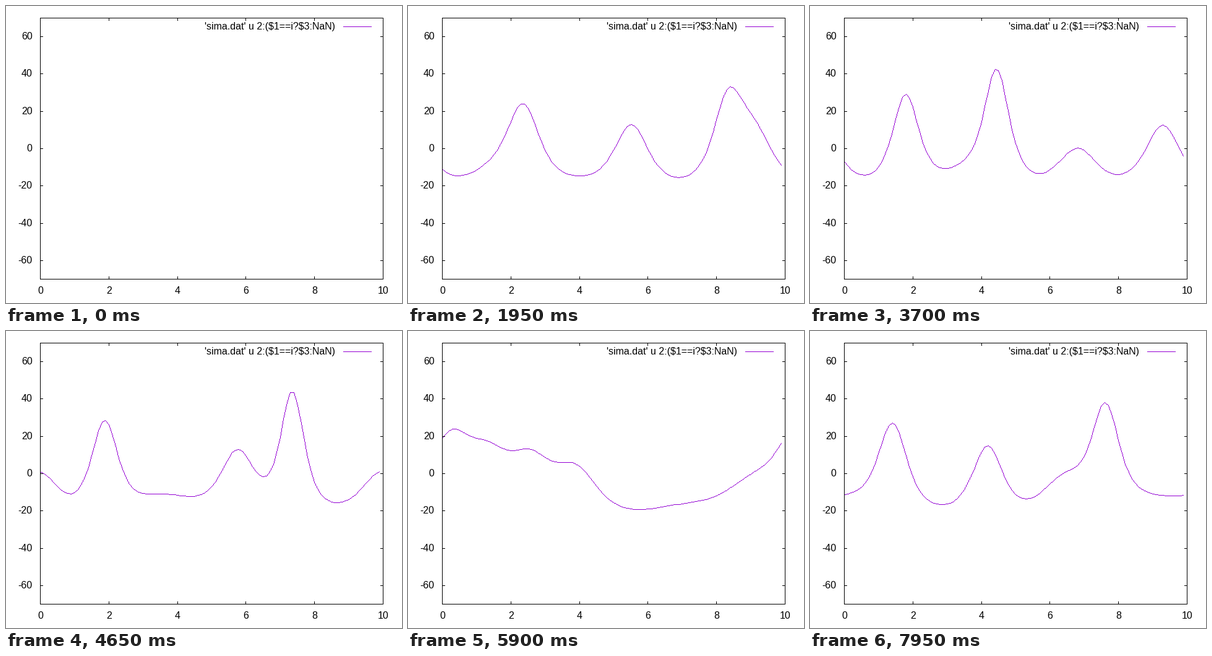
A matplotlib script for the animation above (8000 ms loop, 640 by 480 pixels).

```python
import numpy as np
import matplotlib.pyplot as plt
from matplotlib.animation import FuncAnimation

W, H, DPI = 640, 480, 100
FRAMES, INTERVAL = 160, 50
LEFT, RIGHT, TOP, BOTTOM = 55, 609, 19, 441
XMAX, YMAX, TICK = 10, 70, 4
PURPLE = "#9400d3"
FONT = dict(family="Liberation Sans", size=16 * 72 / DPI, color="black")

# Korteweg-de Vries equation u_t + u u_x + u_xxx = 0 on a ring,
# with the central differences of Zabusky and Kruskal
N, AMP = 100, 20
DX = XMAX / N
FRAME_DT, SUBSTEPS = 0.02, 40


def slope(u):
    p = np.concatenate((u[-2:], u, u[:2]))
    l2, l1, r1, r2 = p[:-4], p[1:-3], p[3:-1], p[4:]
    steepen = (l1 + u + r1) * (r1 - l1) / (6 * DX)
    disperse = (r2 - 2 * r1 + 2 * l1 - l2) / (2 * DX**3)
    return -steepen - disperse


def solve():
    x = np.arange(N) * DX
    u = AMP * np.sin(2 * np.pi * x / XMAX)
    h = FRAME_DT / SUBSTEPS
    rows = [u]
    for _ in range(FRAMES - 1):
        for _ in range(SUBSTEPS):
            a = slope(u)
            b = slope(u + h / 2 * a)
            c = slope(u + h / 2 * b)
            d = slope(u + h * c)
            u = u + h / 6 * (a + 2 * b + 2 * c + d)
        rows.append(u)
    return x, np.array(rows)


def px(x):
    return np.rint(LEFT + np.asarray(x) * (RIGHT - LEFT) / XMAX).astype(int)


def py(y):
    mid, scale = (TOP + BOTTOM) / 2, (BOTTOM - TOP) / (2 * YMAX)
    return np.rint(mid - np.asarray(y) * scale).astype(int)


fig = plt.figure(figsize=(W / DPI, H / DPI), dpi=DPI, facecolor="white")
ax = fig.add_axes([0, 0, 1, 1])


def box(x0, y0, x1, y1, color="black"):
    """Fill whole pixels from (x0, y0) to (x1, y1), both included."""
    ax.add_patch(plt.Rectangle((x0, y0), x1 - x0 + 1, y1 - y0 + 1, fc=color,
                               lw=0, antialiased=False, zorder=3))


def label(x, y, text, align):
    ax.text(x, y, text, ha=align, va="baseline", **FONT)


for y in (TOP, BOTTOM):
    box(LEFT, y, RIGHT, y)
for x in (LEFT, RIGHT):
    box(x, TOP, x, BOTTOM)

for v in range(0, XMAX + 1, 2):
    x = int(px(v))
    box(x, BOTTOM - TICK, x, BOTTOM)
    box(x, TOP, x, TOP + TICK)
    label(x + 0.5, 465, str(v), "center")

for v in range(-60, 61, 20):
    y = int(py(v))
    box(LEFT, y, LEFT + TICK, y)
    box(RIGHT - TICK, y, RIGHT, y)
    label(42.5, y + 5, str(v), "right")

label(532, 38, r"'sima.dat' u 2:(\$1==i?\$3:NaN)", "right")
box(545, 33, 590, 33, PURPLE)

# The curve is a hard-edged line one pixel wide, drawn on a clear layer
INK = np.array([0x94, 0x00, 0xD3, 0xFF], np.uint8)
layer = np.zeros((H, W, 4), np.uint8)
picture = ax.imshow(layer, extent=(0, W, H, 0), interpolation="nearest",
                    aspect="auto", zorder=2)
ax.set_xlim(0, W)
ax.set_ylim(H, 0)
ax.axis("off")

X, U = solve()


def update(n):
    layer[:] = 0
    if n > 0:
        xs, ys = px(X), py(U[n])
        for x0, y0, x1, y1 in zip(xs, ys, xs[1:], ys[1:]):
            t = np.linspace(0, 1, max(x1 - x0, abs(y1 - y0)) + 1)
            cols = np.rint(x0 + t * (x1 - x0)).astype(int)
            rows = np.rint(y0 + t * (y1 - y0)).astype(int)
            layer[rows, cols] = INK
    picture.set_data(layer)
    return picture,


anim = FuncAnimation(fig, update, frames=FRAMES, interval=INTERVAL,
                     init_func=lambda: update(0), repeat=True, repeat_delay=0)
plt.show()
```
